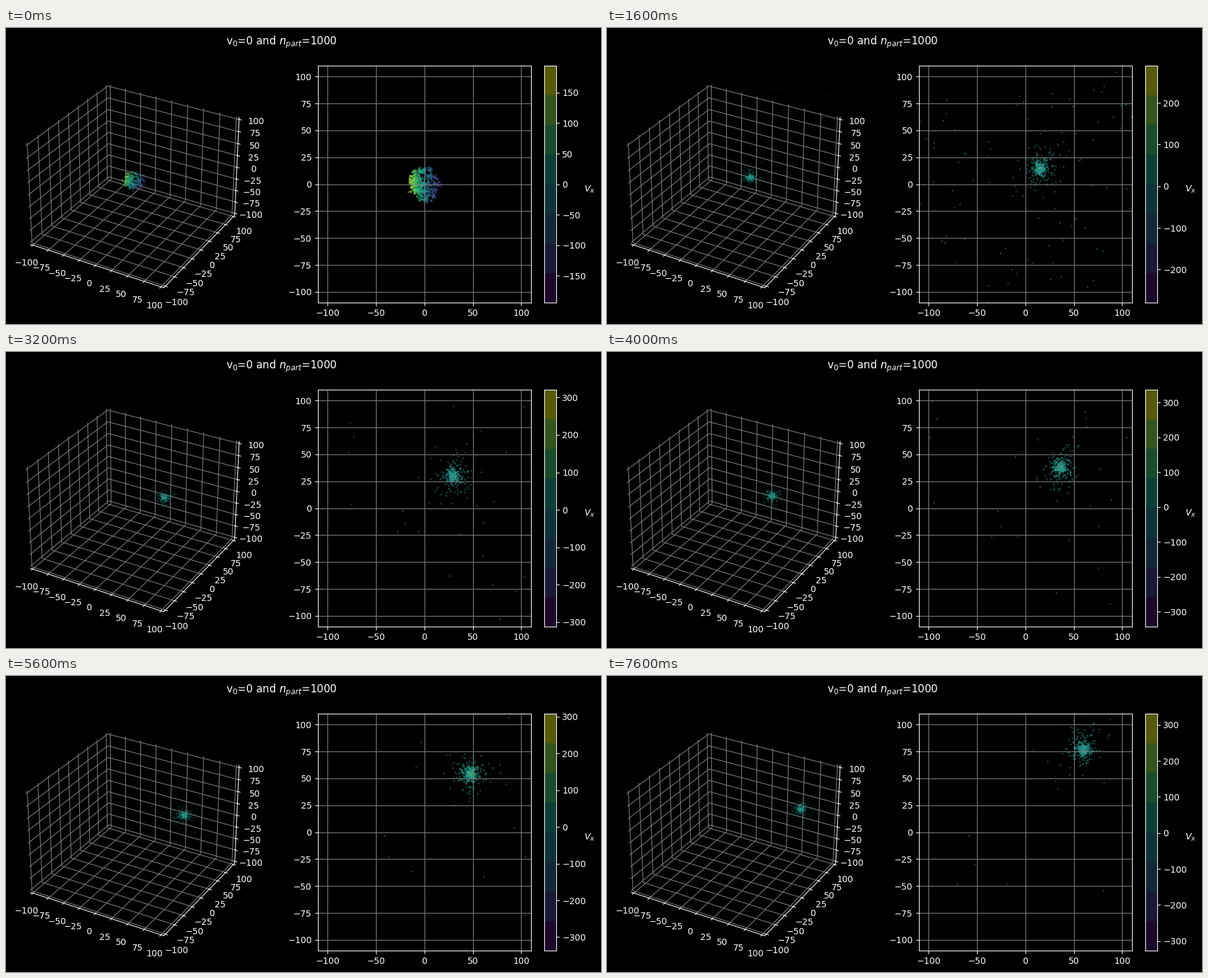
Write a matplotlib script that moves like this. It is 944 px wide and 471 px high and loops after 8000 ms.

```python
import numpy as np
import matplotlib.pyplot as plt
from matplotlib.animation import FuncAnimation
from matplotlib.patches import Rectangle

W, H, DPI = 944, 471, 100
FRAMES, INTERVAL = 20, 400
TOP, SIDE = 60.1, 377
ALPHA, BANDS = 0.4, 8
N_PART, N_BOUND = 1000, 430
BALL_RADIUS, CLUMP = 17, 5

# Key points of the velocity range.
KEYS = [0, 2, 6, 10, 14, 16, 19]
V_LOW = [-194, -278, -281, -343, -337, -312, -327]
V_HIGH = [194, 273, 305, 336, 308, 337, 331]

plt.style.use("dark_background")
plt.rcParams.update({"grid.color": "gray", "grid.linewidth": 0.8,
                     "font.family": "DejaVu Sans", "font.size": 10})
rng = np.random.default_rng(7)


def directions(count):
    vectors = rng.normal(size=(count, 3))
    return vectors / np.linalg.norm(vectors, axis=1, keepdims=True)


def clumpy_ball():
    count = N_PART // CLUMP
    seeds = directions(count) * BALL_RADIUS * rng.random((count, 1)) ** (1 / 3)
    points = np.repeat(seeds, CLUMP, axis=0)
    return points + rng.normal(0, 0.9, points.shape)


# At rest the stars fill a ball that falls inwards.
ball = clumpy_ball()
ball_vx = np.clip(-9.5 * ball[:, 0] + rng.normal(0, 22, N_PART), -194, 194)

# Afterwards bound stars follow ellipses and free stars fly straight out.
radius = 7 * rng.lognormal(0, 0.85, (N_BOUND, 1))
major, minor = directions(N_BOUND), 0.7 * directions(N_BOUND)
phase = rng.uniform(0, 2 * np.pi, (N_BOUND, 1))
omega = 9 / radius
orbit_speed = 115 * np.sqrt(7 / radius[:, 0])
free_dir = directions(N_PART - N_BOUND)
free_speed = 110 * rng.lognormal(0, 0.85, (N_PART - N_BOUND, 1))


def state(n):
    if n == 0:
        return ball, ball_vx
    centre = np.array([4.1 * n - 0.05 * n**2,
                       3.55 * n + 0.026 * n**2,
                       0.9 * n - 0.007 * n**2])
    angle = phase + omega * n
    swell = 0.85 + 0.012 * n
    bound = centre + swell * radius * (major * np.cos(angle) + minor * np.sin(angle))
    swing = minor * np.cos(angle) - major * np.sin(angle)
    free = centre / 2 + free_dir * free_speed * n
    vx = np.concatenate([orbit_speed * swing[:, 0], 45 * free_dir[:, 0]]) + 15
    return np.vstack([bound, free]), vx


def panel(x, width, **kwargs):
    return fig.add_axes([x / W, 1 - (TOP + SIDE) / H, width / W, SIDE / H], **kwargs)


def label(x, y, text, size):
    fig.text(x / W, 1 - y / H, text, fontsize=size, ha="center", va="top")


fig = plt.figure(figsize=(W / DPI, H / DPI), dpi=DPI)
label(436.7, 11.1, r"v$_0$=0 and $n_{part}$=1000", 12)
label(925.6, 248.6, "$V_x$", 10)

ticks = np.arange(-100, 101, 25)
space = panel(10.1, SIDE, projection="3d")
limits = (-100 * 25 / 24, 100 * 25 / 24)
space.set(xlim=limits, ylim=limits, zlim=limits,
          xticks=ticks, yticks=ticks, zticks=ticks)
for axis in (space.xaxis, space.yaxis, space.zaxis):
    axis.set_pane_color((0, 0, 0, 0))

plane = panel(494.8, 338)
plane.set(xlim=(-110, 110), ylim=(-110, 110), xticks=ticks[::2], yticks=ticks)
plane.grid(True)
dots = plane.scatter(ball[:, 0], ball[:, 1], c=ball_vx, s=1, alpha=ALPHA,
                     cmap="viridis")

scale = panel(853.8, 18.9)
scale.set_xticks([])
scale.yaxis.tick_right()
for band in range(BANDS):
    scale.add_patch(Rectangle((0, band / BANDS), 1, 1 / BANDS, linewidth=0,
                              facecolor=plt.cm.viridis((band + 0.5) / BANDS),
                              alpha=ALPHA, antialiased=False,
                              transform=scale.transAxes))

cloud = None


def update(n):
    global cloud
    points, vx = state(n)
    low, high = np.interp(n, KEYS, V_LOW), np.interp(n, KEYS, V_HIGH)
    dots.set_offsets(points[:, :2])
    dots.set_array(vx)
    dots.set_clim(low, high)
    step = 50 if high < 220 else 100
    scale.set_yticks(np.arange(np.ceil(low / step), np.floor(high / step) + 1) * step)
    scale.set_ylim(low, high)

    if cloud is not None:
        cloud.remove()
    near = np.linalg.norm(points, axis=1) < 210
    cloud = space.scatter(*points[near].T, c=vx[near], s=0.1, linewidths=1,
                          alpha=ALPHA, cmap="viridis", vmin=low, vmax=high)
    return dots, cloud


anim = FuncAnimation(fig, update, frames=FRAMES, interval=INTERVAL,
                     init_func=lambda: update(0), repeat=True, repeat_delay=0,
                     blit=False)
plt.show()
```
